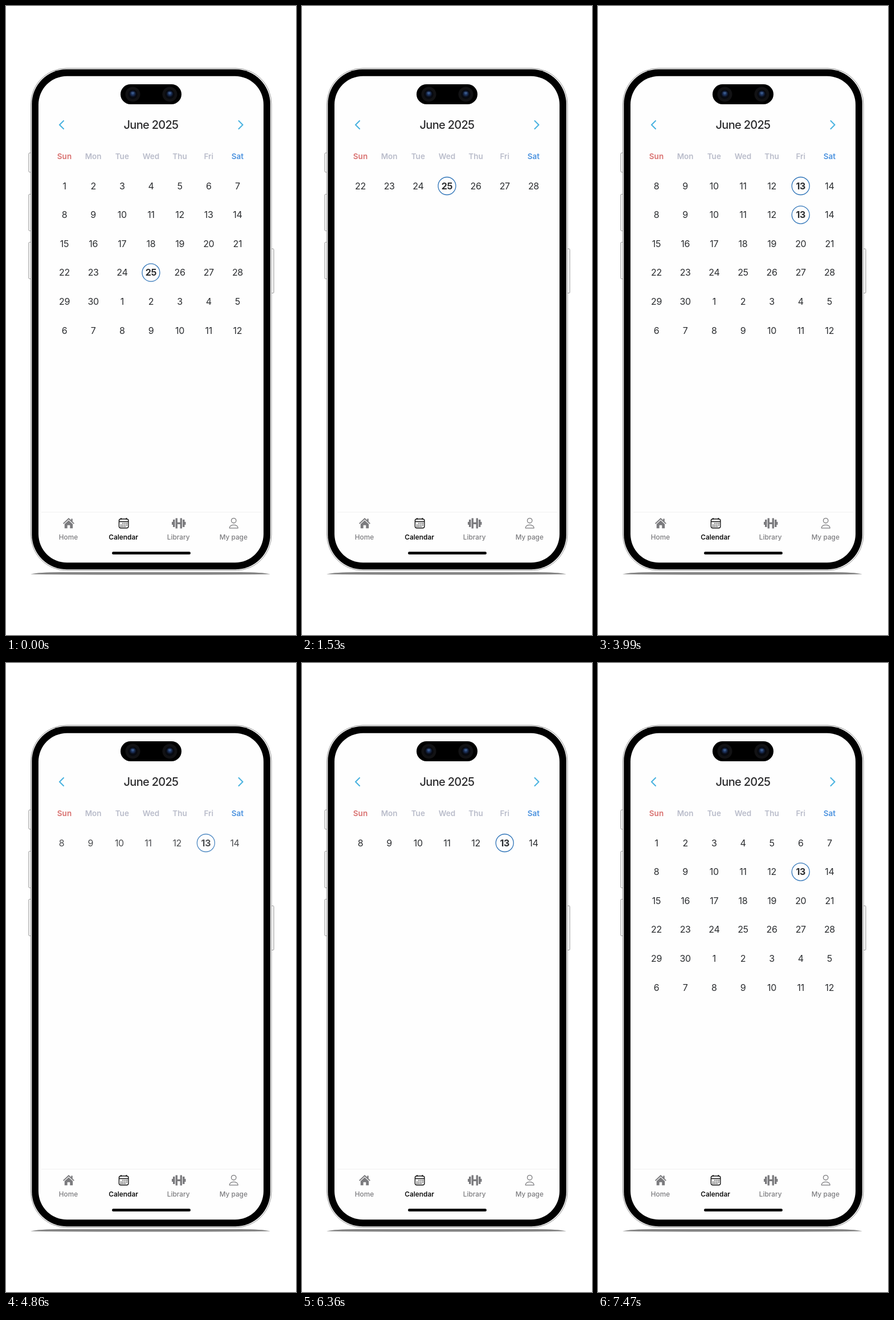
Recreate the animation shown at these times as an HTML page. Size 509 by 1101 pixels, loop 7.86 s.

```html
<!DOCTYPE html>
<html lang="en">
<head>
<meta charset="utf-8">
<title>Calendar</title>
<style>
  html, body { margin: 0; width: 100%; height: 100%; overflow: hidden; background: #fff; }
  svg { display: block; width: 509px; height: 1101px; font-family: Inter, sans-serif; }
  text { text-anchor: middle; }
  .title { font-size: 20px; font-weight: 500; letter-spacing: -.035em; fill: #2b2b2d; }
  .weekday { font-size: 13.5px; font-weight: 600; fill: #b9bcca; }
  .day { font-size: 16px; letter-spacing: -.02em; fill: #2b2d30; }
  .chosen { font-weight: 700; }
  .ring { fill: none; stroke: #2f74b8; stroke-width: 1.3; }
  .tab { font-size: 11.8px; font-weight: 500; fill: #7c7c7f; }
  .tab.active { font-weight: 600; fill: #111; }
  .metal { fill: #fdfdfd; stroke: #929292; }
  .chevron { fill: none; stroke: #4ab3e0; stroke-width: 2.1; stroke-linecap: round; stroke-linejoin: round; }
</style>
</head>
<body>
<svg viewBox="0 0 509 1101">
  <defs>
    <radialGradient id="lens" cy=".4">
      <stop offset="0" stop-color="#34588f"/>
      <stop offset=".55" stop-color="#18294d"/>
      <stop offset="1" stop-color="#080b14"/>
    </radialGradient>
    <clipPath id="sheet"><rect id="sheetArea" x="57" y="280" width="395" height="313"/></clipPath>
    <g id="camera">
      <circle r="13" fill="#121214"/>
      <circle r="8.2" fill="#07090f"/>
      <circle r="6.2" fill="url(#lens)"/>
      <ellipse cy="-2.5" rx="3" ry="1.2" fill="#5577a6" opacity=".5"/>
    </g>
  </defs>

  <!-- phone -->
  <path d="M43 994.5Q58 991 95 991H412Q449 991 464 994.5Q420 995.5 254 995.5T43 994.5Z" fill="#858585"/>
  <g class="metal">
    <rect x="40" y="257" width="5" height="34" rx="2"/>
    <rect x="40" y="329.5" width="5" height="64" rx="1.5"/>
    <rect x="40" y="413.5" width="5" height="64" rx="1.5"/>
    <rect x="465" y="425" width="5" height="77.5" rx="1.5"/>
    <rect x="43.5" y="109" width="422.5" height="879" rx="63"/>
  </g>
  <rect x="45.3" y="110.8" width="418.6" height="875.4" rx="61"/>
  <rect x="57" y="122.7" width="395" height="851.6" rx="50" fill="#fefefe"/>
  <rect x="201" y="137" width="107" height="35" rx="17.5"/>
  <use href="#camera" x="222.5" y="154.5"/>
  <use href="#camera" x="287.5" y="154.5"/>

  <!-- calendar -->
  <path class="chevron" d="M101 201L94 208L101 215M408.500 201L415.500 208L408.500 215"/>
  <text class="title" x="254.5" y="215">June 2025</text>
  <g id="weekdays"></g>
  <g id="month" clip-path="url(#sheet)"></g>
  <g id="week"></g>

  <!-- tab bar -->
  <path d="M62 886H448" stroke="#efeff0"/>
  <g fill="#7b7b7e">
    <path d="M110 896L100 905.500L101.300 906.800L110 898.800L118.700 906.800L120 905.500L116.800 902.400V897.500H114.300V900Z"/>
    <path d="M102.800 907L110 900.300L117.200 907V914.300H112.300V908.800H107.700V914.300H102.800Z"/>
    <path d="M291 903h2v-4h3.500v13h-3.500v-4h-2zM315.500 903h-2v-4h-3.500v13h3.500v-4h2z"/>
    <path d="M297.600 896.500h3.400v7.200h4.600v-7.200h3.400v18h-3.400v-7.600h-4.600v7.600h-3.400z"/>
  </g>
  <g fill="none" stroke="#111" stroke-width="1.4">
    <rect x="198.400" y="898" width="16.500" height="15.800" rx="3"/>
    <path d="M198.400 902.500H215M202 896V899M211.300 896V899"/>
    <path d="M204.500 905.500H213M201 908.500H213M201 911.300H210" stroke-width="1.600" stroke-dasharray="1.700 1.700"/>
  </g>
  <g fill="none" stroke="#7b7b7e" stroke-width="1.3">
    <circle cx="399.700" cy="900.800" r="4.200"/>
    <path d="M392.200 913.800C392 906.500 407.400 906.500 407.200 913.800Z" stroke-linejoin="round"/>
  </g>
  <g id="tabs"></g>
  <rect x="186" y="955.300" width="138" height="4.800" rx="2.400"/>
</svg>

<script>
const LOOP = 7860, COLUMN = 50.65, ROW = 50.55;
const CLOSED_HEIGHT = 60, OPEN_HEIGHT = 313;
const SELECT_AT = 2910;
const byId = id => document.getElementById(id);
const clamp = v => Math.min(1, Math.max(0, v));
const progress = (t, start, length) => clamp((t - start) / length);
const easeOut = p => 1 - (1 - p) ** 2;
const columnX = i => 102.5 + i * COLUMN;

byId('weekdays').innerHTML = ['Sun', 'Mon', 'Tue', 'Wed', 'Thu', 'Fri', 'Sat'].map((name, i) => {
  const color = { 0: '#d9706f', 6: '#4b92df' }[i] || '#b9bcca';
  return `<text class="weekday" x="${columnX(i)}" y="268.300" style="fill:${color}">${name}</text>`;
}).join('');

byId('tabs').innerHTML = ['Home', 'Calendar', 'Library', 'My page'].map((name, i) =>
  `<text class="tab ${i === 1 ? 'active' : ''}" x="${109.5 + i * 96.6}" y="934.300">${name}</text>`).join('');

// Slightly underdamped spring from 0 to 1
function spring(ms) {
  const s = Math.max(0, ms) / 1000;
  return 1 - Math.exp(-16.75 * s) * (Math.cos(15.2 * s) + 1.1 * Math.sin(15.2 * s));
}

// Cell 0 is June 1; cells past 29 run into July
function dayCell(cell, row, selected, opacity = 1) {
  const x = columnX(cell % 7), y = 315 + row * ROW, chosen = cell === selected;
  return `<g opacity="${opacity}">` +
    (chosen ? `<circle class="ring" cx="${x}" cy="${y}" r="15.500"/>` : '') +
    `<text class="day ${chosen ? 'chosen' : ''}" x="${x}" y="${y + 5.8}">${cell % 30 + 1}</text></g>`;
}

function weekRow(week, selected, shift = 0, opacity = 1) {
  const cells = Array.from({ length: 7 }, (_, i) => dayCell(week * 7 + i, 0, selected)).join('');
  return `<g transform="translate(${shift})" opacity="${opacity}">${cells}</g>`;
}

// The old week drifts aside and fades, then the new one appears in place
function swapWeeks(from, to, p, distance, selected) {
  return p < .5
    ? weekRow(from, selected, distance * easeOut(p * 2), 1 - p * 2)
    : weekRow(to, selected, 0, p * 2 - 1);
}

function weekMarkup(t, selected) {
  if (t < SELECT_AT) return weekRow(3, selected);
  if (t < 5700) return swapWeeks(1, 2, progress(t, 4840, 270), -17, selected);
  return swapWeeks(2, 1, progress(t, 6130, 230), 10, selected);
}

function openness(t) {
  if (t < 960) return 1;
  if (t < 1890) return 1 - spring(t - 960);
  if (t < 3990) return spring(t - 1890);
  if (t < 7140) return 1 - spring(t - 3990);
  return spring(t - 7140);
}

function render(t) {
  const selected = t < SELECT_AT ? 24 : 12;
  const weekMode = (t >= 960 && t < 1890) || (t >= 3990 && t < 7140);
  const press = progress(t, 2720, 150) - progress(t, SELECT_AT, 250);
  const height = CLOSED_HEIGHT + (OPEN_HEIGHT - CLOSED_HEIGHT) * openness(t);
  byId('sheetArea').setAttribute('height', Math.max(0, height));

  let month = '';
  for (let cell = weekMode ? 7 : 0; cell < 42; cell++)
    month += dayCell(cell, Math.floor(cell / 7), selected, cell === 12 ? 1 - .8 * press : 1);
  byId('month').innerHTML = month;
  byId('week').innerHTML = weekMode ? weekMarkup(t, selected) : '';
}

function frame() {
  render(performance.now() % LOOP);
  requestAnimationFrame(frame);
}
frame();
</script>
</body>
</html>
```
